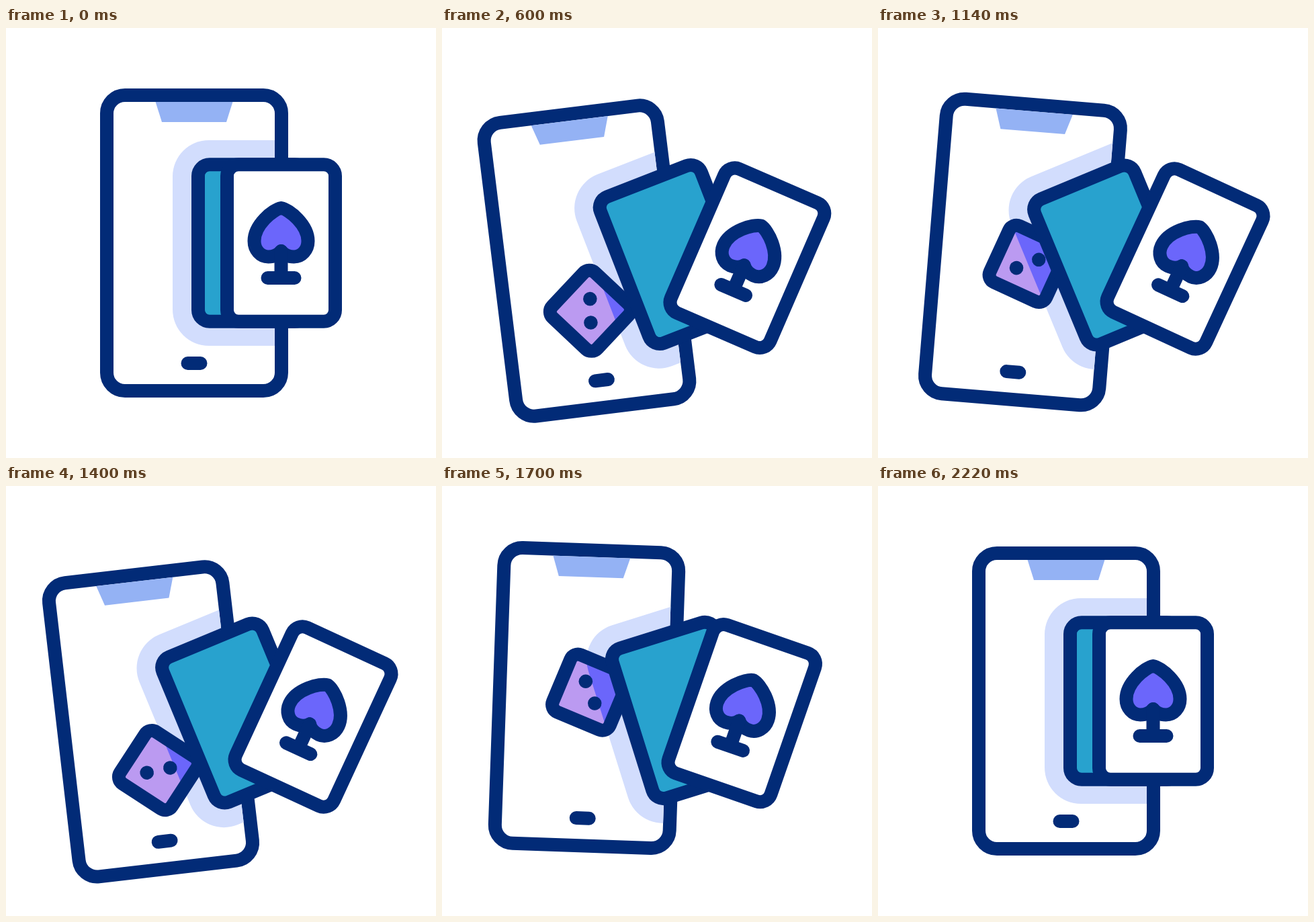
Write an HTML page with a canvas that moves like this. It is 640 by 640 pixels and loops after 2400 ms.

```html
<!DOCTYPE html>
<html lang="en">
<head>
<meta charset="utf-8">
<title>Mobile card game</title>
<style>
html, body { margin: 0; width: 100%; height: 100%; overflow: hidden; background: #fff; }
canvas { display: block; }
</style>
</head>
<body>
<canvas id="stage" width="640" height="640"></canvas>
<script>
const ctx = document.getElementById('stage').getContext('2d');
const LOOP = 2400;
const NAVY = '#022b77', TEAL = '#28a2ce', VIOLET = '#6b66fb', LILAC = '#bb9af1';
const SHADE = '#d2ddfd', NOTCH = '#94b2f4', YELLOW = '#fecb50', WHITE = '#fff';

// Monotone cubic interpolation through [time, value] keys.
function track(...keys) {
  const slope = i => (keys[i + 1][1] - keys[i][1]) / (keys[i + 1][0] - keys[i][0]);
  const tangents = keys.map((_, i) => {
    if (i === 0 || i === keys.length - 1) return 0;
    const a = slope(i - 1), b = slope(i);
    return a * b > 0 ? 2 * a * b / (a + b) : 0;
  });
  return t => {
    if (t <= keys[0][0]) return keys[0][1];
    const i = keys.findIndex(k => k[0] > t) - 1;
    if (i < 0) return keys[keys.length - 1][1];
    const [t0, v0] = keys[i], [t1, v1] = keys[i + 1];
    const d = t1 - t0, u = (t - t0) / d, w = 1 - u;
    return v0 * (1 + 2 * u) * w * w + v1 * u * u * (3 - 2 * u)
      + d * u * w * (tangents[i] * w - tangents[i + 1] * u);
  };
}

const phone = {
  x: track([200, 280], [380, 245], [550, 215.5], [1710, 215.5], [1960, 245.5], [2215, 280]),
  y: track([200, 320], [380, 335.5], [550, 348.5], [880, 318], [950, 318], [1360, 352.5],
    [1690, 315.5], [1825, 315.5], [1960, 316.5], [2215, 320]),
  angle: track([200, 0], [380, -2.4], [700, -8], [860, 0], [1010, 8], [1400, -6.6],
    [1515, -8], [1700, 1.95], [1825, 8], [1960, 5.65], [2215, 0])
};
const die = {
  x: track([200, 340], [380, 292], [620, 220], [960, 220], [1390, 227], [1720, 220.5],
    [1960, 277.5], [2215, 338]),
  y: track([200, 306], [380, 367], [560, 425], [860, 322], [960, 306], [1390, 423.5], [1720, 306]),
  angle: track([200, 0], [380, -9.3], [860, -103.6], [1270, -165], [1400, -147],
    [1700, -67.5], [1960, -24], [2215, 0])
};
const fan = track([200, 0], [380, .34], [660, 1], [1600, 1], [1700, .776], [1920, 0]);
const slide = track([1920, 0], [1960, .047], [2215, 1]);
const sparkHead = track([1930, 0], [1960, .2], [2060, 1]);
const sparkTail = track([1980, 0], [2150, 1]);

const mix = (a, b, p) => a + (b - a) * p;
const poseOf = (tracks, t) => [tracks.x(t), tracks.y(t), tracks.angle(t)];

function at([x, y, angle], draw) {
  ctx.save();
  ctx.translate(x, y);
  ctx.rotate(angle * Math.PI / 180);
  draw();
  ctx.restore();
}

function box(w, h, r) {
  const path = new Path2D();
  path.roundRect(-w / 2, -h / 2, w, h, r);
  return path;
}

const PHONE = box(260, 440, 27), SCREEN = box(240, 420, 17);
const CARD = box(161, 233.5, 17), CARD_SHADE = box(237, 306, 54), DIE = box(92, 92, 12);
const NOTCH_SHAPE = new Path2D('M-59-215H59L48-180H-48Z');
const SPADE = new Path2D('M0-52C-12-50-40-27-40-3C-40 10-31 20.5-19 20.5C-11 20.5-4 17 0 12' +
  'C4 17 11 20.5 19 20.5C31 20.5 40 10 40-3C40-27 12-50 0-52Z');
const STEM = new Path2D('M0 12V52M-20 52H20');

function fill(path, color) {
  ctx.fillStyle = color;
  ctx.fill(path);
}

function outline(path, color) {
  if (color) fill(path, color);
  ctx.stroke(path);
}

// Fills the shadow of the back card inside another shape.
function shadeInside(shape, pose, cardPose, color) {
  const matrix = new DOMMatrix().translate(pose[0], pose[1]).rotate(pose[2]);
  const region = new Path2D();
  region.addPath(shape, matrix);
  ctx.save();
  ctx.clip(region);
  at(cardPose, () => fill(CARD_SHADE, color));
  ctx.restore();
}

function drawPhone() {
  outline(PHONE, WHITE);
  ctx.save();
  ctx.clip(SCREEN);
  fill(NOTCH_SHAPE, NOTCH);
  ctx.restore();
  ctx.stroke(new Path2D('M-9.5 179H9.5'));
}

function drawPips() {
  for (const s of [-1, 1]) {
    ctx.beginPath();
    ctx.arc(12.5 * s, -12.5 * s, 10.3, 0, 7);
    ctx.fillStyle = NAVY;
    ctx.fill();
  }
}

function drawSpark(x, y, dx, dy, t) {
  const head = sparkHead(t), tail = sparkTail(t);
  if (head <= tail) return;
  ctx.strokeStyle = YELLOW;
  ctx.beginPath();
  ctx.moveTo(x + dx * tail, y + dy * tail);
  ctx.lineTo(x + dx * head, y + dy * head);
  ctx.stroke();
}

function render(t) {
  const p = fan(t);
  const homeX = t < 1200 ? 366.5 : 409.5 - 43 * slide(t);
  const back = [mix(homeX, 346, p), 320 + 18 * p, -22.5 * p];
  const front = [409.5 + 47.5 * p, 320 + 23.5 * p, 24.8 * p];
  const phonePose = poseOf(phone, t), diePose = poseOf(die, t);

  fill(new Path2D('M0 0H640V640H0Z'), WHITE);
  ctx.lineWidth = 20;
  ctx.lineCap = ctx.lineJoin = 'round';
  ctx.strokeStyle = NAVY;

  at(phonePose, drawPhone);
  shadeInside(SCREEN, phonePose, back, SHADE);

  at(diePose, () => fill(DIE, LILAC));
  shadeInside(DIE, diePose, back, VIOLET);
  at(diePose, () => { outline(DIE); drawPips(); });

  at(back, () => outline(CARD, TEAL));
  at(front, () => {
    outline(CARD, WHITE);
    outline(SPADE, VIOLET);
    ctx.stroke(STEM);
  });

  drawSpark(511, 171.5, 7, -32, t);
  drawSpark(530.5, 191.5, 30.5, -11.5, t);
}

function tick() {
  render(performance.now() % LOOP);
  requestAnimationFrame(tick);
}
tick();
</script>
</body>
</html>
```
